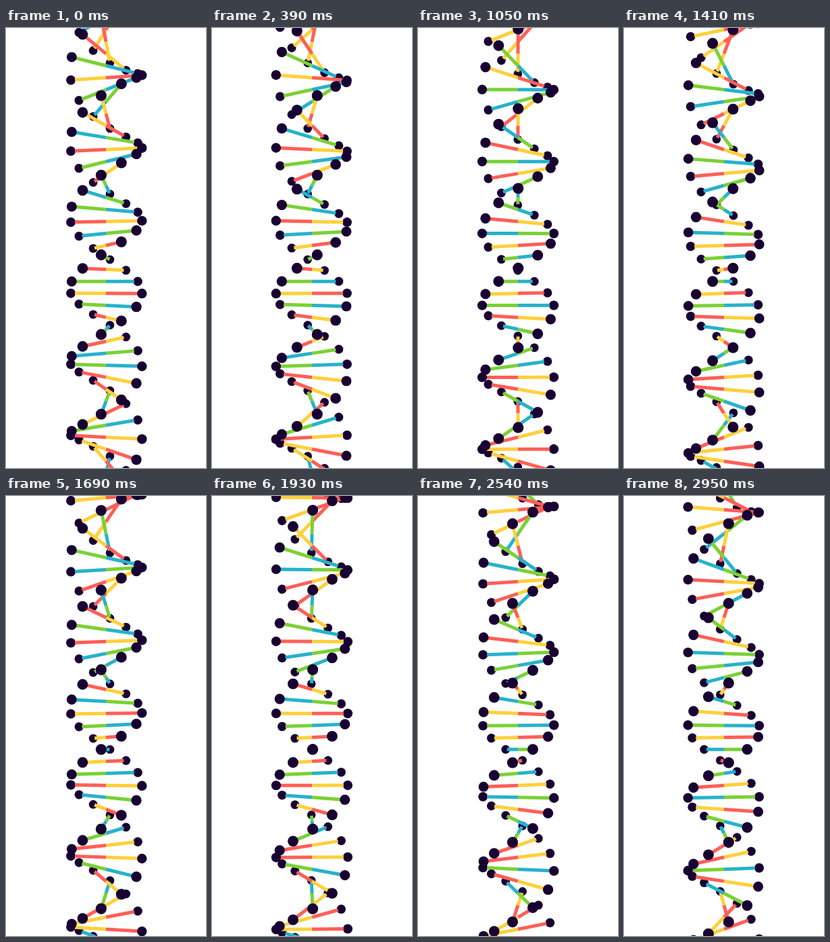
Recreate the animation shown at these times as an HTML page with a canvas. Size 296 by 648 pixels, loop 3 s.

```html
<!DOCTYPE html>
<html lang="en">
<head>
<meta charset="utf-8">
<title>Turning helix</title>
<style>
  html, body { margin: 0; width: 100%; height: 100%; overflow: hidden; background: #fff; }
  canvas { display: block; }
</style>
</head>
<body>
<canvas id="stage" width="296" height="648"></canvas>
<script>
const ctx = document.getElementById('stage').getContext('2d');

const LOOP = 3000;
const STEP = 46.35;        // ms per pose
const TURN = 1.62;         // degrees per pose
const CX = 148, CY = 373.2;
const RADIUS = 53;
const BALL_SIZE = 7.1;
const DEPTH = 0.098;       // helix radius / camera distance
const GAP = 17.65;         // distance between rungs
const MIDDLE = 23;         // rung at eye level
const START = -67;         // its angle at time zero

const COLORS = { r: '#ff5f57', y: '#ffd03c', g: '#7ad135', b: '#27b2cb' };
const PARTNER = { r: 'y', y: 'r', g: 'b', b: 'g' };
const RUNGS = 'rbyyybrbgyybrgrbgbygrbrgygrbygbyybygryyby';
const BALL = '#190033';

function project(angle, y, radius) {
  const z = Math.cos(angle);
  const scale = 1 / (1 - DEPTH * z * radius / RADIUS);
  return {
    x: CX + radius * Math.sin(angle) * scale,
    y: CY + y * scale,
    z, scale
  };
}

function drawBall(p) {
  ctx.fillStyle = BALL;
  ctx.beginPath();
  ctx.arc(p.x, p.y, BALL_SIZE * Math.pow(p.scale, 1.25), 0, Math.PI * 2);
  ctx.fill();
}

function drawBar(p, y, color) {
  ctx.strokeStyle = color;
  ctx.lineWidth = 5;
  ctx.beginPath();
  ctx.moveTo(CX, CY + y);
  ctx.lineTo(p.x, p.y);
  ctx.stroke();
}

function draw(time) {
  const pose = Math.floor((time + 30) / STEP);
  const parts = [];

  [...RUNGS].forEach((key, i) => {
    const row = i - MIDDLE;
    const y = row * GAP;
    const angle = (START - 30 * row + TURN * pose) * Math.PI / 180;
    [[angle, key], [angle + Math.PI, PARTNER[key]]].forEach(([a, c]) => {
      const ball = project(a, y, RADIUS);
      // bars stop at the surface of the ball
      const end = project(a, y, RADIUS - BALL_SIZE + 1);
      parts.push({ z: ball.z, paint: () => drawBall(ball) });
      parts.push({ z: ball.z / 2, paint: () => drawBar(end, y, COLORS[c]) });
    });
  });

  ctx.fillStyle = '#fff';
  ctx.fillRect(0, 0, 296, 648);
  parts.sort((a, b) => a.z - b.z).forEach(part => part.paint());
}

let begin = null;
function tick(now) {
  if (begin === null) begin = now;
  draw((now - begin) % LOOP);
  requestAnimationFrame(tick);
}
draw(0);
requestAnimationFrame(tick);
</script>
</body>
</html>
```
